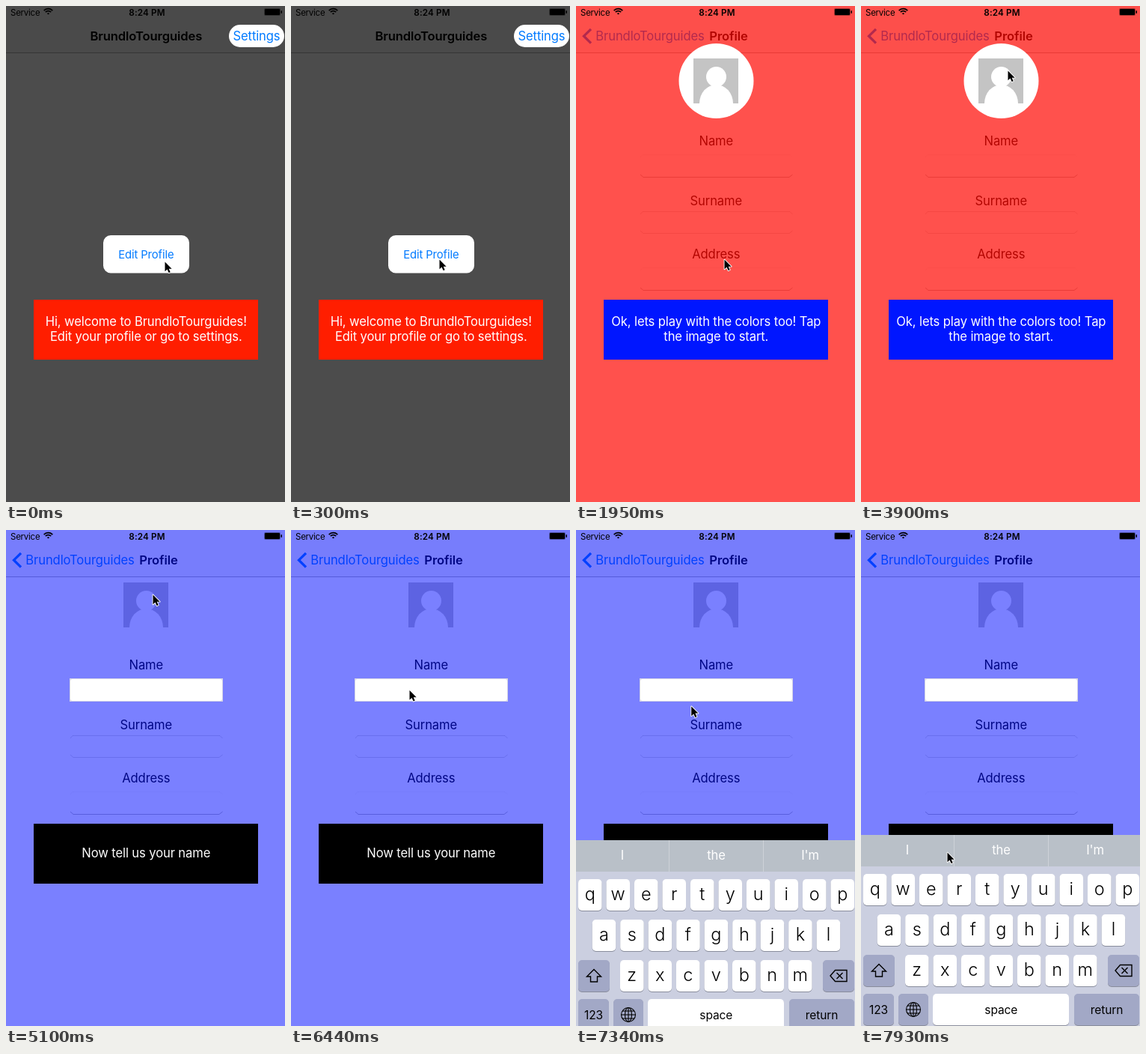
Recreate the animation shown at these times as an HTML page with a canvas. Size 373 px wide and 662 px high, loop 8000 ms.

```html
<!DOCTYPE html>
<html lang="en">
<head>
<meta charset="utf-8">
<title>App walkthrough</title>
<style>
  html, body { margin: 0; width: 100%; height: 100%; overflow: hidden; background: #fff; }
  canvas { display: block; width: 373px; height: 662px; }
</style>
</head>
<body>
<canvas id="stage"></canvas>
<script>
const W = 373, H = 662, LOOP = 8000, MID = 187.3;
const APP = 'BrundloTourguides', LINK = '#007aff';
const canvas = document.getElementById('stage');
const ctx = canvas.getContext('2d');
const dpr = window.devicePixelRatio || 1;
canvas.width = W * dpr;
canvas.height = H * dpr;

const clamp = v => Math.min(1, Math.max(0, v));
const lerp = (a, b, p) => a + (b - a) * p;
const smooth = v => { v = clamp(v); return v * v * (3 - 2 * v); };
const spring = s => s <= 0 ? 0 : 1 - Math.exp(-13 * s) * (1 + 13 * s);

function text(str, x, y, { size = 16.6, color = '#000', align = 'center', weight = 400, spacing = -0.007 * size } = {}) {
  ctx.font = `${weight} ${size}px Inter, sans-serif`;
  ctx.letterSpacing = spacing + 'px';
  ctx.textAlign = align;
  ctx.fillStyle = color;
  ctx.fillText(str, x, y);
}

function rect(x, y, w, h, color) {
  ctx.fillStyle = color;
  ctx.fillRect(x, y, w, h);
}

function roundRect(x, y, w, h, r, color) {
  ctx.beginPath();
  ctx.roundRect(x, y, w, h, r);
  ctx.fillStyle = color;
  ctx.fill();
}

function line(points, { color = '#000', width = 1.4, close = false } = {}) {
  ctx.beginPath();
  points.forEach(([x, y]) => ctx.lineTo(x, y));
  if (close) ctx.closePath();
  ctx.strokeStyle = color;
  ctx.lineWidth = width;
  ctx.stroke();
}

function faded(alpha, draw) {
  ctx.save();
  ctx.globalAlpha = clamp(alpha);
  draw();
  ctx.restore();
}

function shifted(x, y, draw) {
  ctx.save();
  ctx.translate(x, y);
  draw();
  ctx.restore();
}

// Tints the whole stage except for the rounded holes [x, y, w, h, r].
function overlay(color, holes = []) {
  ctx.beginPath();
  ctx.rect(0, 0, W, H);
  holes.forEach(([x, y, w, h, r]) => ctx.roundRect(x, y, w, h, r));
  ctx.fillStyle = color;
  ctx.fill('evenodd');
}

function statusBar() {
  text('Service', 6, 12.5, { size: 11.5, align: 'left', spacing: -0.25 });
  text('8:24 PM', 188.5, 12.5, { size: 11.7, weight: 600, spacing: 0.15 });
  ctx.strokeStyle = '#000';
  ctx.lineWidth = 1.7;
  [8, 5, 1.4].forEach(r => {
    ctx.beginPath();
    ctx.arc(56.5, 11.6, r, -Math.PI * 0.76, -Math.PI * 0.24);
    ctx.stroke();
  });
  roundRect(345, 3, 22, 10, 2, 'rgba(0,0,0,.35)');
  roundRect(346, 4, 20, 8, 1, '#000');
  roundRect(367.5, 6, 1.5, 4, 1, '#000');
}

function avatar() {
  rect(157, 70, 60, 60, '#c4c4c4');
  ctx.fillStyle = '#fff';
  ctx.beginPath();
  ctx.arc(187.5, 94.5, 13.5, 0, 7);
  ctx.fill();
  ctx.beginPath();
  ctx.ellipse(187.5, 130, 22.5, 25, 0, Math.PI, 0);
  ctx.fill();
}

function field(y, h, top, bottom) {
  const edge = (points, alpha) => faded(alpha, () => line(points, { color: '#777', width: 1 }));
  edge([[86, y + 4], [89, y + 0.5], [286, y + 0.5], [289.5, y + 4]], top);
  edge([[86, y + h - 4], [90, y + h - 0.5], [285, y + h - 0.5], [289.5, y + h - 4]], bottom);
}

function profilePage() {
  avatar();
  text('Name', MID, 186);
  text('Surname', MID, 266);
  text('Address', MID, 337);
  field(198, 31, 0.06, 0.5);
  field(274, 30, 0.25, 0.25);
  field(349, 31, 0.06, 0.5);
}

function navBar(p) {
  rect(0, 0, W, 62, '#fafafa');
  rect(0, 62, W, 1, '#b2b2b2');
  const titleX = lerp(MID, 99, p);
  faded(1 - 1.3 * p, () => {
    text(APP, titleX, 46, { weight: 600 });
    text('Settings', 366.5, 46, { color: LINK, align: 'right' });
  });
  faded(p * 1.3 - 0.3, () => {
    text(APP, titleX, 46, { color: LINK });
    line([[20, 30.8], [10.5, 40.2], [20, 49.6]], { color: LINK, width: 3.3 });
    text('Profile', lerp(350, 204, p), 46, { weight: 600 });
  });
}

function pages(p) {
  rect(0, 0, W, H, '#fff');
  const edge = W * (1 - p);
  if (p < 1) {
    faded(p > 0 ? 0.25 : 1, () =>
      text('Edit Profile', MID - 0.3 * W * p, 337, { size: 14.8, color: LINK }));
  }
  if (p > 0) {
    if (p < 1) {
      const shade = ctx.createLinearGradient(edge - 9, 0, edge, 0);
      shade.addColorStop(0, 'rgba(0,0,0,0)');
      shade.addColorStop(1, 'rgba(0,0,0,.2)');
      rect(edge - 9, 62, 9, H, shade);
    }
    rect(edge, 62, W, H, '#fff');
    shifted(edge, 0, profilePage);
  }
  navBar(p);
}

function callout(color, ...lines) {
  rect(37, 392, 300, 80, color);
  lines.forEach((str, i) => text(str, MID, 437 + 20 * (i - (lines.length - 1) / 2), { color: '#fff' }));
}

function key(x, y, w, color = '#fff') {
  roundRect(x, y + 1, w, 42, 5, '#898d9c');
  roundRect(x, y, w, 42, 5, color);
}

function keyboard() {
  const grey = '#a2a8c6';
  rect(0, 0, W, 256, '#cbcfe0');
  rect(0, 0, W, 42, '#b9c0c8');
  rect(124, 0, 1, 42, '#cdd2d8');
  rect(250, 0, 1, 42, '#cdd2d8');
  ['I', 'the', "I'm"].forEach((word, i) => text(word, 62 + 125.5 * i, 25.5, { color: '#fff' }));

  [['qwertyuiop', 3, 52], ['asdfghjkl', 21.7, 106], ['zxcvbnm', 59, 160]].forEach(([row, left, y]) =>
    [...row].forEach((letter, i) => {
      const x = left + 37.5 * i;
      key(x, y, 31.5);
      text(letter, x + 15.7, y + 28, { size: 23.5, weight: 300, spacing: 0 });
    }));

  key(3, 160, 42, grey);
  key(330, 160, 42, grey);
  key(3, 212, 41, grey);
  key(50, 212, 40, grey);
  key(96, 212, 182);
  key(285, 212, 87, grey);
  text('123', 23.5, 239, { size: 15.5 });
  text('space', 187.3, 238.5, { size: 15.5 });
  text('return', 328.5, 238.5, { size: 15.5 });

  line([[24, 172.5], [33.5, 182], [28.5, 182], [28.5, 189], [19.5, 189], [19.5, 182], [14.5, 182]], { close: true });
  line([[340, 181], [346.5, 173.5], [362, 173.5], [362, 188.5], [346.5, 188.5]], { close: true });
  line([[348.5, 177], [356.5, 185]]);
  line([[356.5, 177], [348.5, 185]]);

  ctx.lineWidth = 1.1;
  [9.5, 4.5].forEach(rx => {
    ctx.beginPath();
    ctx.ellipse(70, 233, rx, 9.5, 0, 0, 7);
    ctx.stroke();
  });
  line([[70, 223.5], [70, 242.5]], { width: 1.1 });
  [[228, 8], [233, 9.5], [238, 8]].forEach(([y, r]) => line([[70 - r, y], [70 + r, y]], { width: 1.1 }));
}

// Each move: start time, end time, target tip position.
const moves = [
  [0, 300, 198.5, 338.5],
  [3000, 3900, 196.5, 86.5],
  [5700, 6440, 158.5, 214],
  [7190, 7930, 115.5, 430.5]
];

function pointer(t) {
  let x = 212.5, y = 341.5;
  for (const [start, end, toX, toY] of moves) {
    const p = smooth((t - start) / (end - start));
    x = lerp(x, toX, p);
    y = lerp(y, toY, p);
  }
  shifted(x, y, () => {
    ctx.scale(0.88, 0.88);
    ctx.lineJoin = 'round';
    line([[0, 0], [0, 14.5], [3.4, 11.4], [5.8, 16.6], [8.2, 15.6], [5.9, 10.4], [10.4, 10.4]],
      { color: '#fff', width: 2, close: true });
    ctx.fillStyle = '#000';
    ctx.fill();
  });
}

function render(t) {
  ctx.setTransform(dpr, 0, 0, dpr, 0, 0);
  pages(t < 1350 ? 0 : t < 1950 ? spring((t - 1309) / 1000) : 1);

  if (t < 1350) {
    overlay('rgba(0,0,0,.7)', [[130, 306, 115, 50.5, 10]]);
    roundRect(298, 25, 74, 30, 15, '#fff');
    text('Settings', 366.5, 46, { color: LINK, align: 'right' });
    callout('#ff1e00', `Hi, welcome to ${APP}!`, 'Edit your profile or go to settings.');
  } else if (t < 5100) {
    overlay('rgba(255,8,2,.7)');
    if (t >= 1950) {
      roundRect(137.5, 50, 100, 100, 50, '#fff');
      avatar();
      callout('#0016ff', 'Ok, lets play with the colors too! Tap', 'the image to start.');
    }
  } else {
    overlay('rgba(0,12,255,.52)');
    rect(85, 198, 205, 31, '#d4d4e6');
    roundRect(86, 199, 203, 29, 3, '#fff');
    callout('#000', 'Now tell us your name');
    const rise = spring((t - 6919) / 1000);
    if (t >= 7030) shifted(0, Math.round(H - 255 * rise), keyboard);
    if (t > 7150 && t < 7300) rect(93, 221, 1, 1, '#555');
  }
  statusBar();
  pointer(t);
}

function hold(t) {
  return t < 6440 ? Math.floor(t / 150) * 150 : 6440 + Math.floor((t - 6440) / 149) * 149;
}

const begin = performance.now();
function tick() {
  render(hold((performance.now() - begin) % LOOP));
  requestAnimationFrame(tick);
}
tick();
</script>
</body>
</html>
```
